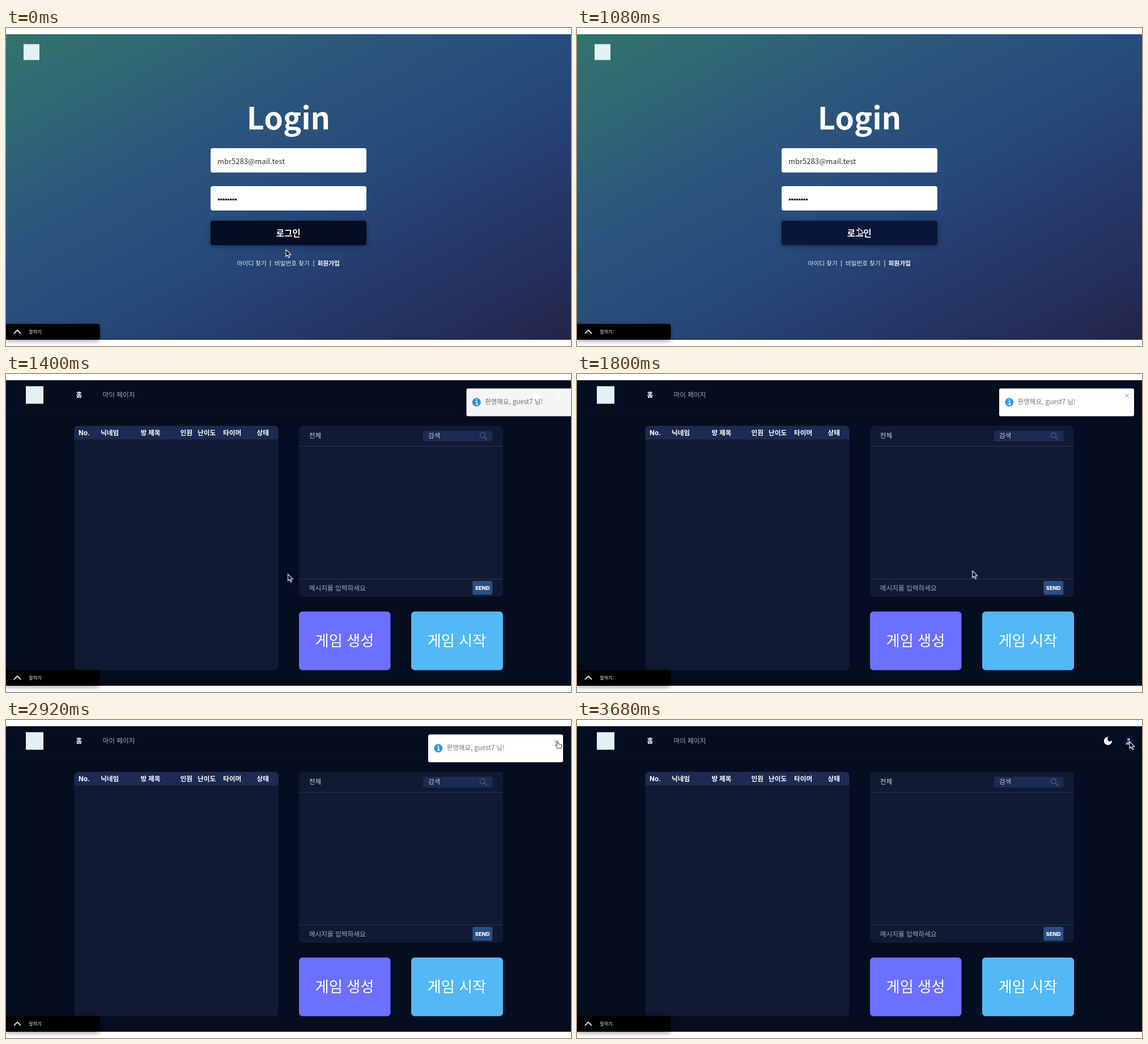
These frames come from a looping animation (997 px wide and 561 px high, 4200 ms). An HTML page:

```html
<!DOCTYPE html>
<html lang="ko">
<head>
<meta charset="utf-8">
<title>Login</title>
<style>
  html, body { margin: 0; width: 100%; height: 100%; overflow: hidden; background: #fff; }
  svg { display: block; width: 997px; height: 561px; overflow: hidden; }
  text { font-family: 'Noto Sans CJK KR', 'Noto Sans CJK JP', 'Noto Sans CJK', 'Noto Sans', sans-serif; fill: #fff; }
  .ui text { font-family: Inter, 'Noto Sans CJK KR', 'Noto Sans CJK JP', 'Noto Sans CJK', sans-serif; font-size: 11.7px; }
  .mid { text-anchor: middle; }
  .b { font-weight: 700; }
  .ui .dim { fill: #a3aab8; }
  .ui .big { font-size: 26.3px; font-weight: 500; }
  .links text { font-size: 10.7px; fill: #e6ebf3; }
  .links .b { fill: #fff; }
  .card { filter: drop-shadow(0 2px 4px #0006); }

  .login, .lobby, .btn, .cursor, .arrow, .hand, .toast { animation: 4200ms linear infinite; }
  .login { animation-name: login; animation-timing-function: step-end; }
  .lobby { animation-name: lobby; animation-timing-function: step-end; }
  .btn { animation-name: hover; }
  .cursor { animation-name: move; }
  .arrow { animation-name: arrow; animation-timing-function: step-end; }
  .hand { animation-name: hand; animation-timing-function: step-end; }
  .toast { animation-name: toast; }

  @keyframes login { 0% { visibility: visible; } 26.6%, 100% { visibility: hidden; } }
  @keyframes lobby { 0% { visibility: hidden; } 26.6%, 100% { visibility: visible; } }
  @keyframes hover { 0%, 17.5% { fill: #050d22; } 23%, 100% { fill: #0a1639; } }
  @keyframes arrow { 0% { opacity: 1; } 53.7% { opacity: 0; } 77%, 100% { opacity: 1; } }
  @keyframes hand { 0% { opacity: 0; } 53.7% { opacity: 1; } 77%, 100% { opacity: 0; } }
  @keyframes move {
    0%, 15% { transform: translate(494px, 391px); animation-timing-function: ease-in-out; }
    24.5%, 33% { transform: translate(497px, 353px); animation-timing-function: ease-in; }
    42.86% { transform: translate(697px, 348px); animation-timing-function: ease-out; }
    57% { transform: translate(979px, 62px); }
    58.1% { transform: translate(979px, 62px); animation-timing-function: ease-in-out; }
    68%, 82% { transform: translate(973px, 38px); animation-timing-function: ease-in-out; }
    87.6%, 100% { transform: translate(975px, 38px); }
  }
  /* bounce in from the right, bounce out to the right */
  @keyframes toast {
    0%, 26.43% { transform: translateX(2232px); opacity: 0; animation-timing-function: cubic-bezier(.215, .61, .355, 1); }
    36.43% { transform: translateX(-18.6px); opacity: 1; animation-timing-function: cubic-bezier(.215, .61, .355, 1); }
    38.93% { transform: translateX(7.4px); animation-timing-function: cubic-bezier(.215, .61, .355, 1); }
    41.43% { transform: translateX(-3.7px); animation-timing-function: cubic-bezier(.215, .61, .355, 1); }
    43.1%, 71.19% { transform: none; opacity: 1; animation-timing-function: ease; }
    74.52% { transform: translateX(-15px); opacity: 1; animation-timing-function: ease; }
    87.86%, 100% { transform: translateX(1488px); opacity: 0; }
  }
</style>
</head>
<body>
<svg viewBox="0 0 997 561">
  <defs>
    <linearGradient id="sky" x1="0" y1="0" x2="1" y2="1">
      <stop offset="0" stop-color="#32746d"/>
      <stop offset=".15" stop-color="#2f6973"/>
      <stop offset=".33" stop-color="#2c567c"/>
      <stop offset=".55" stop-color="#264a7b"/>
      <stop offset=".73" stop-color="#25396a"/>
      <stop offset=".88" stop-color="#242e59"/>
      <stop offset="1" stop-color="#222446"/>
    </linearGradient>
    <linearGradient id="user" x1="0" y1="0" x2="0" y2="1">
      <stop offset="0" stop-color="#8fa4ff"/>
      <stop offset="1" stop-color="#5f9bf0"/>
    </linearGradient>
  </defs>

  <g class="login">
    <rect y="11" width="997" height="539" fill="url(#sky)"/>
    <rect y="548.8" width="997" height="1.2" fill="#1b2547"/>
    <rect x="31" y="28.5" width="28" height="28" fill="#e4f1f4"/>
    <text class="mid b" x="498.5" y="179" font-size="54">Login</text>
    <rect x="361" y="212" width="275" height="43" rx="4" fill="#fff"/>
    <text x="373" y="239.5" font-size="13" style="fill:#333">mbr5283@mail.test</text>
    <rect x="361" y="279" width="275" height="43" rx="4" fill="#fff"/>
    <path d="M375.4 302.5h30.5" stroke="#111" stroke-width="3.7" stroke-linecap="round" stroke-dasharray="0 4.29"/>
    <g class="card"><rect class="btn" x="361" y="340" width="275" height="43" rx="4"/></g>
    <text class="mid b" x="498.2" y="367.8" font-size="15.5">로그인</text>
    <g class="links">
      <text x="407.5" y="419">아이디 찾기</text>
      <text x="473.7" y="419">비밀번호 찾기</text>
      <text class="b" x="549.5" y="419">회원가입</text>
      <path d="M466.5 410v11M543 410v11" stroke="#dde4ee"/>
    </g>
  </g>

  <g class="lobby ui">
    <rect y="11" width="997" height="539" fill="#050d20"/>
    <path d="M0 63.5h997" stroke="#0b1529"/>
    <path d="M0 548.5h997" stroke="#10102c"/>
    <rect x="35" y="21.5" width="31" height="31" fill="#e4f1f4"/>
    <text class="b" x="123.5" y="41.2">홈</text>
    <text class="dim" x="170.5" y="41.2">마이 페이지</text>
    <path fill="#fff" transform="translate(927.4 27.4) scale(.8)" d="M12 3a9 9 0 1 0 9 9c0-.46-.04-.92-.1-1.36a5.4 5.4 0 0 1-4.4 2.26 5.4 5.4 0 0 1-3.14-9.8C12.9 3 12.5 3 12 3z"/>
    <circle cx="973.5" cy="37.5" r="9.5" fill="#0b1225"/>
    <g fill="url(#user)">
      <circle cx="973.5" cy="34.6" r="2.6"/>
      <path d="M968.6 43.6v-1.4c0-2.4 2-3.6 4.9-3.6s4.9 1.2 4.9 3.6v1.4z"/>
    </g>

    <rect x="120.5" y="91.5" width="360" height="431" rx="7" fill="#0f1b33"/>
    <path d="M120.5 115.5v-17a7 7 0 0 1 7-7h346a7 7 0 0 1 7 7v17z" fill="#1b2b52"/>
    <g class="b">
      <text x="128" y="107.6">No.</text>
      <text x="167" y="107.6">닉네임</text>
      <text x="237.5" y="107.6">방 제목</text>
      <text x="307.5" y="107.6">인원</text>
      <text x="338" y="107.6">난이도</text>
      <text x="383" y="107.6">타이머</text>
      <text x="442.5" y="107.6">상태</text>
    </g>

    <rect x="517" y="91.5" width="360" height="301.5" rx="7" fill="#0f1b33"/>
    <path d="M517 127.5h360M517 361.5h360" stroke="#293449"/>
    <text x="534.7" y="113.3" style="fill:#cfd4dd">전체</text>
    <rect x="736" y="100" width="122.5" height="19" rx="2" fill="#1b2b52"/>
    <text x="744.8" y="113.3" style="fill:#b9c0ce">검색</text>
    <g fill="none" stroke="#56637f" stroke-width="1.3">
      <circle cx="840.8" cy="108" r="4.4"/>
      <path d="M844 111.3l5 5"/>
    </g>
    <text class="dim" x="534.7" y="381.5">메시지를 입력하세요</text>
    <rect x="823.3" y="365" width="35" height="24.5" rx="3" fill="#2a4f84"/>
    <text class="mid" x="840.8" y="380.7" style="font-size:9.4px;font-weight:800">SEND</text>

    <rect x="517" y="419" width="161.5" height="103.5" rx="6" fill="#6b70ff"/>
    <text class="mid big" x="597.5" y="480.3">게임 생성</text>
    <rect x="715" y="419" width="162" height="103.5" rx="6" fill="#52b8f6"/>
    <text class="mid big" x="795.5" y="480.3">게임 시작</text>
  </g>

  <g>
    <path class="card" d="M0 522h161a4.500 4.500 0 0 1 4.500 4.500v19a4.500 4.500 0 0 1-4.500 4.500H0z"/>
    <path d="M14 539l6-6 6 6" fill="none" stroke="#e8e8e8" stroke-width="1.8"/>
    <text class="b" x="40.500" y="539" font-size="7.800" style="font-weight:500">말하기:</text>
  </g>

  <g class="toast">
    <rect class="card" x="745" y="25.500" width="238" height="49" rx="3" fill="#fff"/>
    <circle cx="762.800" cy="49.800" r="7.500" fill="#3498db"/>
    <path d="M761 48.500h2.600v5M761 53.500h4.800" fill="none" stroke="#fff" stroke-width="1.400"/>
    <circle cx="762.900" cy="45.700" r="1.100" fill="#fff"/>
    <text x="777.700" y="53.200" font-size="11.500" style="fill:#757575">환영해요, guest7 님!</text>
    <path d="M967.500 35l6.400 6.400m0-6.400l-6.400 6.400" stroke="#aaa" stroke-width="1.300"/>
  </g>

  <g class="cursor">
    <path class="arrow" d="M0 0v12l2.800-2.500 2 4.400 2-.9-1.900-4.300h3.800z" fill="#000" stroke="#fff" stroke-width="1.100"/>
    <path class="hand" d="M-1.300 1.300c0-1.700 2.200-1.700 2.300 0l.4 3.400c.3-1 2-.9 2.100.3.400-.7 1.900-.5 2 .5.500-.5 1.800-.2 1.800.9v2.200c0 1.700-1.100 2.300-1.200 3.500H-.2c-.3-1.600-2.300-2.900-3.400-4.700-.7-1.200.6-2 1.500-1.100l1.200 1z" fill="#fff" stroke="#111" stroke-width=".9" stroke-linejoin="round"/>
  </g>
</svg>
</body>
</html>
```
